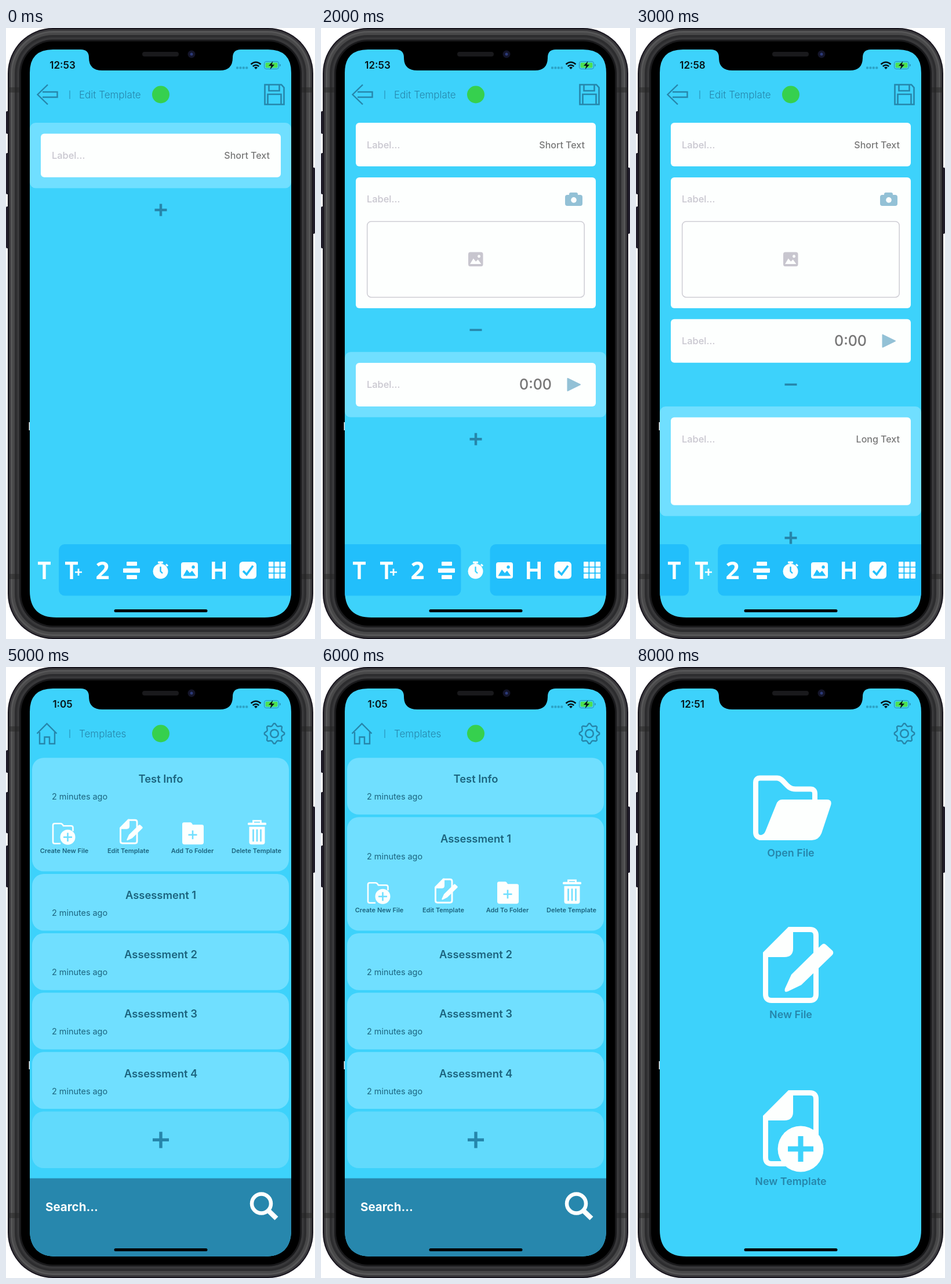
An HTML page that plays this animation: 533 px wide and 1051 px high, repeating every 9000 ms.

```html
<!DOCTYPE html>
<html lang="en">
<head>
<meta charset="utf-8">
<title>Form template app</title>
<style>
  html, body { margin: 0; width: 100%; height: 100%; overflow: hidden; background: #fff; }
  svg { display: block; width: 100vw; height: 100vh; }
  text { font-family: Inter, Roboto, sans-serif; }
</style>
</head>
<body>
<svg id="stage" viewBox="0 0 533 1051">
  <defs>
    <clipPath id="glass">
      <path d="M81 37H129Q143 37 143 51Q143 73 166 73H369Q391 73 391 51Q391 37 405 37H452Q492 37 492 77V968Q492 1014 446 1014H87Q41 1014 41 968V77Q41 37 81 37Z"/>
    </clipPath>
  </defs>
  <g id="phone"></g>
  <g clip-path="url(#glass)">
    <rect width="533" height="1051" fill="#3dd2fb"/>
    <g id="screen"></g>
  </g>
</svg>
<script>
const BG = '#3dd2fb', LIGHT = '#70dfff', BAR = '#22bffb', INK = '#2686ab',
      TITLE = '#1c647f', PAPER = '#fdfffe', PALE = '#c8c6cf', SOFT = '#93c1d6';

// Drawing helpers
const rect = (x, y, w, h, r, fill, more = '') =>
  `<rect x="${x}" y="${y}" width="${w}" height="${h}" rx="${r}" fill="${fill}" ${more}/>`;
const circle = (x, y, r, fill) => `<circle cx="${x}" cy="${y}" r="${r}" fill="${fill}"/>`;
const shape = (d, fill) => `<path d="${d}" fill="${fill}" fill-rule="evenodd"/>`;
const line = (d, color, width, more = '') =>
  `<path d="${d}" fill="none" stroke="${color}" stroke-width="${width}" ${more}/>`;
const text = (s, x, y, size, weight, fill, anchor = 'middle') =>
  `<text x="${x}" y="${y}" font-size="${size}" font-weight="${weight}" fill="${fill}" text-anchor="${anchor}">${s}</text>`;
const move = (x, y, body, scale = 1) =>
  `<g transform="translate(${x} ${y}) scale(${scale})">${body}</g>`;
const minus = (x, y, r, w, color = INK) => line(`M${x - r} ${y}h${2 * r}`, color, w);
const plus = (x, y, r, w, color = INK) =>
  minus(x, y, r, w, color) + line(`M${x} ${y - r}v${2 * r}`, color, w);

// Icons
const picture = color => shape(
  'M4 0H25Q29 0 29 4V24Q29 28 25 28H4Q0 28 0 24V4Q0 0 4 0Z' +
  'M21 5.5a2.8 2.8 0 1 0 .1 0ZM3.5 23.5L10 12.5 15 18.5 19 14.5 25.5 23.5Z', color);

const page = line('M44 4.5H81Q91.5 4.5 91.5 15V116Q91.5 126.5 81 126.5H15Q4.5 126.5 4.5 116V48', PAPER, 9) +
  shape('M0 44L44 0H52V37Q52 52 37 52H0Z', PAPER);
const editPage = page +
  shape('M49 82L101 31Q105 27 109 31L120 41Q123 45 119 49L66 100 43 111Q36 114 38 106Z', PAPER);
const newPage = page + circle(65, 101, 39.5, PAPER) + plus(65, 101, 22, 9, BG);

const openFolder =
  line('M216 293.5Q206.5 293.5 206.5 284V199Q206.5 191 214 191H243C256 191 258 210 275 210H301Q308.5 210 308.5 218V232', PAPER, 9) +
  shape('M252 228H329Q339 228 336 238L320 286Q315 298 303 298H212V289Q220 290 223 283L242 236Q245 228 252 228Z', PAPER);

const backArrow = line('M72 97.5L54.5 114.5 72 131.5M63 110H88.5V119H63', INK, 2.4);
const house = line('M58 112V132H66.5V120.5H75V132H84V112M53.5 114.5L70.5 97.5 87.5 114.5', INK, 2.4);
const disk = line('M446.5 97.5H475L479.5 102.5V131.5H446.5ZM453.5 98V108H471.5V98M451.5 131V114H474.5V131', INK, 2.6);

function gear() {
  const points = [];
  for (let i = 0; i < 32; i++) {
    const a = (i - 0.5) * Math.PI / 16 + (i % 2 ? -0.03 : 0.03);
    const r = (i >> 1) % 2 ? 13.6 : 17.2;
    points.push(`${(463 + r * Math.sin(a)).toFixed(1)} ${(114.5 - r * Math.cos(a)).toFixed(1)}`);
  }
  return line(`M${points.join('L')}Z`, INK, 2.4, 'stroke-linejoin="round"') +
    `<circle cx="463" cy="114.5" r="6.8" fill="none" stroke="${INK}" stroke-width="2.6"/>`;
}

function phone() {
  const rims = [[0, '#17141d'], [2, '#39383b'], [5, '#565657'], [8, '#484849'],
                [12, '#2d2d2f'], [16, '#38383a'], [20, '#19191b'], [23, '#000']];
  const buttons = [[0, 143, 39], [0, 215, 71], [0, 307, 72], [528, 240, 114]];
  return buttons.map(([x, y, h]) => rect(x, y, 5, h, 2, '#211d2b')).join('') +
    rims.map(([d, c]) => rect(3 + d, d, 527 - 2 * d, 1051 - 2 * d, 78 - d, c)).join('') +
    [102, 939].map(y => rect(3, y, 20, 9, 0, '#222', 'opacity=".45"') +
      rect(510, y, 20, 9, 0, '#222', 'opacity=".45"')).join('') +
    rect(235, 41, 63, 8, 4, '#19191c') + circle(320, 45, 6.5, '#14152a') + circle(320, 45, 2.5, '#2b3a78') +
    rect(39.5, 678, 1.5, 14, 0, '#eee');
}

function status(clock) {
  let s = text(clock, 97.5, 70, 17, 600, '#071317');
  for (let i = 0; i < 4; i++) s += rect(397 + i * 5.4, 66.5, 4, 4, 1.2, '#2ba2c6');
  s += line('M422.5 62.5Q431 55 439.5 62.5M425.7 66Q431 61.5 436.3 66', '#071317', 2.5) +
    shape('M428 68Q431 65.5 434 68L431 71Z', '#071317');
  return s + rect(445.5, 57.5, 25, 13, 3.5, 'none', 'stroke="#2a91b1"') +
    rect(447.5, 59.5, 21, 9, 2, '#4de052') + rect(472, 62, 1.6, 4, 0.8, '#2a91b1') +
    shape('M460.5 57L453 65H457.5L455.5 71.5 463 63H458.5Z', '#071317');
}

const homeBar = rect(186.5, 1000, 161, 5, 2.5, '#000');
const header = (left, name, right) => left + line('M110 107.5V122', INK, 1) +
  text(name, 126, 121, 17, 300, INK, 'start') + circle(267, 114.5, 15, '#36d04e') + right;

// Form editor
const field = {
  short: [75, y => text('Short Text', 455, y + 43.5, 16, 500, '#777', 'end')],
  long: [151, y => text('Long Text', 455, y + 43.5, 16, 500, '#777', 'end')],
  timer: [75, y => text('0:00', 398, y + 46.5, 25, 500, '#777', 'end') +
    shape(`M425.5 ${y + 27}L447 ${y + 37.5} 425.5 ${y + 48}Z`, SOFT) +
    line(`M425.5 ${y + 27}L447 ${y + 37.5} 425.5 ${y + 48}Z`, SOFT, 2, 'stroke-linejoin="round"')],
  photo: [225, y => rect(421, y + 30, 30, 19, 4, SOFT) + rect(428, y + 26, 15, 8, 3, SOFT) +
    circle(436, y + 39, 4.8, PAPER) +
    rect(79.7, y + 75.8, 374.5, 130.5, 7, 'none', 'stroke="#d0cfd6" stroke-width="1.6"') +
    move(254, y + 128.5, picture(PALE), 0.88)]
};

function toolbar(selected) {
  const left = 41 + selected * 50.1;
  let s = rect(0, 888, left, 88.5, 10, BAR) + rect(left + 50.1, 888, 533 - left, 88.5, 10, BAR);
  const letterT = 'M55 918h22v5.2h-8.3V948h-5.4v-24.8H55Z';
  s += shape(letterT, PAPER) + move(47, 0, shape(letterT, PAPER)) + plus(125, 936, 6, 2.7, PAPER) +
    `<g style="font-family:Open Sans">` +
    `<text x="166.5" y="948" font-size="42" font-weight="700" fill="${PAPER}" text-anchor="middle" style="font-family:'Open Sans',sans-serif">2</text></g>` +
    rect(208, 918, 18, 7, 1, PAPER) + rect(202, 929.5, 29, 7.5, 1, PAPER) + rect(208, 941, 18, 7, 1, PAPER) +
    circle(266.5, 934.5, 13, PAPER) + rect(262, 917.5, 9, 3.5, 1, PAPER) + rect(265, 919, 3, 4, 0, PAPER) +
    line('M276 922.5l3 3', PAPER, 3) +
    line('M266.5 926.5V934.5L270 938', selected === 4 ? BG : BAR, 2.4) +
    move(302, 919, picture(PAPER)) +
    shape('M355 918h5.6v12h12.8v-12h5.6v30h-5.6v-13h-12.8v13H355Z', PAPER) +
    rect(402.5, 918, 29.5, 29.5, 6, PAPER) + line('M409 934L415 940 426 925', BAR, 3.6);
  for (let i = 0; i < 9; i++)
    s += rect(453 + i % 3 * 10.3, 918 + Math.floor(i / 3) * 10.3, 8.4, 8.4, 1, PAPER);
  return s;
}

function editor(clock, kinds, tool) {
  let y = 163, s = status(clock) + header(backArrow, 'Edit Template', disk);
  kinds.forEach((kind, i) => {
    const [height, detail] = field[kind];
    if (i === kinds.length - 1) {
      if (i) { s += minus(267, y + 18.6, 10.5, 3.6); y += 56.4; }
      s += rect(41, y, 451, height + 37.4, 10, LIGHT) + plus(267, y + height + 75, 10.5, 4.4);
      y += 18.7;
    }
    s += rect(60, y, 414, height, 6, PAPER) + text('Label...', 79, y + 43.5, 16.4, 500, PALE, 'start') + detail(y);
    y += height + 18.9;
  });
  return s + toolbar(tool) + homeBar;
}

// Template list
const actions = y => {
  const names = ['Create New File', 'Edit Template', 'Add To Folder', 'Delete Template'];
  return names.map((n, i) => text(n, 100.5 + i * 110.5, y + 163.5, 11, 600, TITLE)).join('') +
    move(0, y - 258,
      line('M94 405.5H84Q81 405.5 81 402.5V374Q81 371 84 371H94Q97 371 99 375H112Q115.5 375 115.5 378V384', PAPER, 2.6) +
      circle(106.5, 394.5, 13, PAPER) + plus(106.5, 394.5, 7.5, 2.6, LIGHT) +
      move(196, 363.5, editPage, 0.328) +
      shape('M307 369H318Q320 369 322 373H338Q341 373 341 376V403Q341 407 337 407H308Q304 407 304 403V372Q304 369 307 369Z', PAPER) +
      plus(322, 390.5, 7.5, 2.6, LIGHT) +
      rect(417, 369.5, 32, 4, 1.5, PAPER) + line('M426.5 370V366.5H439.5V370', PAPER, 2.8) +
      shape('M419.5 376.5H446.5V403Q446.5 407 442.5 407H423.5Q419.5 407 419.5 403Z', PAPER) +
      line('M426.5 381V402M433 381V402M439.5 381V402', LIGHT, 2.6));
};

const searchBar = rect(41, 879.5, 451, 140, 0, '#2787ad') +
  text('Search...', 68, 935.5, 20.5, 700, PAPER, 'start') +
  `<circle cx="440.5" cy="923" r="16.5" fill="none" stroke="${PAPER}" stroke-width="6.5"/>` +
  line('M453 935.5L466.5 948.5', PAPER, 8.5);

function list(clock, open, search = searchBar) {
  let y = 156.2, s = status(clock) + header(house, 'Templates', gear());
  ['Test Info', 'Assessment 1', 'Assessment 2', 'Assessment 3', 'Assessment 4'].forEach((name, i) => {
    const extra = i === open ? 97.7 : 0;
    s += rect(45, y, 443, 97.6 + extra, 20, LIGHT) + text(name, 267, y + 43.2, 18.4, 600, TITLE) +
      text('2 minutes ago', 79, y + 72.2, 14.4, 400, TITLE, 'start');
    if (extra) s += actions(y);
    y += 102.1 + extra;
  });
  return s + rect(45, y, 443, 97.6, 20, '#61dafc') + plus(267, y + 49, 14, 5.4) + search + homeBar;
}

const start = () => status('12:51') + gear() + openFolder +
  move(219, 447, editPage) + move(219, 728, newPage) +
  text('Open File', 267, 325.5, 17.9, 600, INK) + text('New File', 267, 604, 17.9, 600, INK) +
  text('New Template', 267, 890.5, 17.9, 600, INK) + homeBar;

const scenes = [
  editor('12:53', ['short'], 0),
  editor('12:53', ['short', 'photo'], 5),
  editor('12:53', ['short', 'photo', 'timer'], 4),
  editor('12:58', ['short', 'photo', 'timer', 'long'], 1),
  list('1:05', -1),
  list('1:05', 0),
  list('1:05', 1),
  list('1:06', -1, ''),
  start()
];

const screenGroup = document.getElementById('screen');
document.getElementById('phone').innerHTML = phone();
let shown = -1;
function tick() {
  const index = Math.floor(performance.now() / 1000) % scenes.length;
  if (index !== shown) screenGroup.innerHTML = scenes[shown = index];
  requestAnimationFrame(tick);
}
tick();
</script>
</body>
</html>
```
